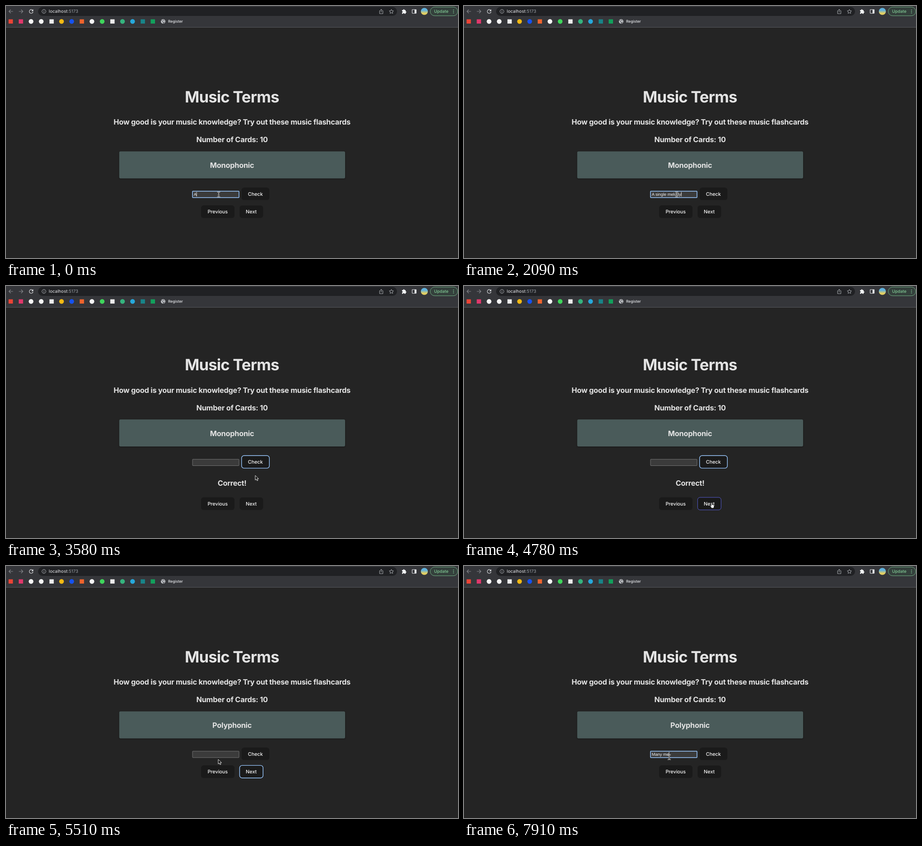
An HTML page that plays this animation: 1001x559 px, repeating every 8 s.

```html
<!DOCTYPE html>
<html lang="en">
<head>
<meta charset="utf-8">
<title>Music Terms</title>
<style>
  html, body { margin: 0; width: 100%; height: 100%; overflow: hidden; background: #242424; }
  svg { display: block; width: 100vw; height: 100vh; }
  text { font-family: Inter, "Open Sans", sans-serif; text-rendering: geometricPrecision; }
  .mid { text-anchor: middle; fill: #e3e3e3; font-weight: 700; }
  .h1 { font-size: 34.7px; letter-spacing: -.85px; }
  .h2 { font-size: 16.3px; letter-spacing: -.23px; }
  .btn rect { fill: #1a1a1a; stroke: none; }
  .btn text { font-size: 10.8px; font-weight: 500; fill: #fafafa; text-anchor: middle; }
  .btn.hover rect { stroke: #646cff; stroke-width: .8; }
  .btn.focus rect { stroke: #99c8ff; stroke-width: 1.4; }
  .field rect { fill: #3b3b3b; stroke: #858585; stroke-width: .8; }
  .field.focus rect { stroke: #99c8ff; stroke-width: 1.5; }
  .field text { font: 9.27px "Liberation Sans", Arial, sans-serif; fill: #f4f4f4; }
  .card { fill: #4a5b5a; filter: drop-shadow(0 1.4px 1.4px rgba(0, 0, 0, .4)); }
  .line { fill: none; stroke: #e8eaed; stroke-width: 1.1; }
  .dim { stroke: #85888c; }
  .thin { stroke: #bdc1c6; stroke-width: .9; }
</style>
</head>
<body>
<svg viewBox="0 0 1001 559" preserveAspectRatio="none">
  <defs>
    <linearGradient id="photo" x2="0" y2="1">
      <stop offset=".35" stop-color="#62b2dc"/>
      <stop offset=".75" stop-color="#e3cf62"/>
    </linearGradient>
  </defs>
  <rect width="1001" height="559" fill="#242424"/>

  <g id="toolbar">
    <rect width="1001" height="47" fill="#35363a"/>
    <rect y="46.8" width="1001" height="1" fill="#5a5c60"/>
    <rect x="71" y="2" width="795" height="20" rx="10" fill="#202124"/>
    <path class="line dim" d="M15.5 12H6.5M10.5 8 6.5 12l4 4M28.5 12h9M33.5 8l4 4-4 4"/>
    <path class="line" d="M59 9.3A4.2 4.2 0 1 0 59.9 13"/>
    <path fill="#e8eaed" d="M60.3 7.3v4.2h-4.2z"/>
    <circle class="line thin" cx="84" cy="12" r="4.3"/>
    <path class="line thin" d="M84 11.3v3M84 9.3v1"/>
    <text x="94.8" y="15.4" font-size="9.7" fill="#e8eaed">localhost<tspan fill="#9aa0a6">:5173</tspan></text>
    <path class="line thin" d="M829 10.5h-1.7v6.5h7.4v-6.5H833M831 14V7.3M829 9.2l2-2 2 2"/>
    <path class="line thin" stroke-linejoin="round" d="M853.5 7.5l1.4 3 3.3.4-2.4 2.2.6 3.3-2.900-1.600-2.900 1.600.6-3.300-2.400-2.200 3.300-.4z"/>
    <path fill="#f1f3f4" d="M877 9h2.300a1.700 1.700 0 1 1 3.400 0h2.300v2.700a1.700 1.700 0 1 1 0 3.400v2.100h-2.600a1.500 1.500 0 0 0-3 0H877v-2.600a1.500 1.500 0 0 0 0-3z"/>
    <rect class="line" x="899.5" y="8" width="9" height="8.2" rx=".6"/>
    <rect x="904.8" y="8" width="3.7" height="8.2" fill="#e8eaed"/>
    <circle cx="926.5" cy="12" r="7.8" fill="url(#photo)"/>
    <rect x="939.5" y="2.3" width="61" height="19.4" rx="9.7" fill="#34403c" stroke="#6fae82"/>
    <text x="948" y="15.3" font-size="9.2" font-weight="500" fill="#81c995">Update</text>
    <g fill="#81c995"><circle cx="991" cy="8.6" r=".9"/><circle cx="991" cy="12" r=".9"/><circle cx="991" cy="15.4" r=".9"/></g>
    <g id="marks"></g>
    <circle cx="348" cy="34.3" r="5" fill="#c6c9cd"/>
    <path fill="none" stroke="#4a4c50" stroke-width="1.1" d="M344 32l3 1.5v2l1.5 1.5v2M347.5 29.8l1 2 3 .5M352 35.5l-2 .5-.5 2"/>
    <text x="359" y="37.4" font-size="8.34" font-weight="500" fill="#e8eaed">Register</text>
  </g>

  <g id="upper">
    <text class="mid h1" x="500.3" y="213.6">Music Terms</text>
    <text class="mid h2" x="500.6" y="263">How good is your music knowledge? Try out these music flashcards</text>
    <text class="mid h2" x="500.6" y="302.4">Number of Cards: 10</text>
    <rect class="card" x="250.7" y="322.6" width="500.3" height="60" rx="3"/>
    <text class="mid h2" id="term" x="500.6" y="359"></text>
    <g class="field" id="field">
      <rect x="413" y="410.8" width="103" height="14.2" rx="1"/>
      <text id="typed" x="415.7" y="420.8"></text>
      <path id="caret" fill="none" stroke="#fff" stroke-width=".9" d="M0 412.5v10"/>
    </g>
    <g class="btn" id="check">
      <rect x="521.7" y="402.8" width="61.6" height="27.8" rx="5.4"/>
      <text x="552.3" y="420.7">Check</text>
    </g>
  </g>

  <text class="mid h2" id="verdict" x="500.6" y="442.7">Correct!</text>

  <g id="lower">
    <g class="btn" id="prev">
      <rect x="432" y="442.3" width="74" height="28" rx="5.6"/>
      <text x="468.8" y="460.3">Previous</text>
    </g>
    <g class="btn" id="next">
      <rect x="517.4" y="442.4" width="51.9" height="27.8" rx="5.4"/>
      <text x="543.2" y="460.3">Next</text>
    </g>
  </g>

  <g id="pointer">
    <g id="beam" fill="none">
      <path stroke="#f2f2f2" stroke-width="1.9" d="M-3.2-5.5Q-.6-5.5 0-4.3.6-5.5 3.2-5.5M-3.2 5.5Q-.6 5.5 0 4.3.6 5.5 3.2 5.5M0-4.3V4.3M-1.7 1.5H1.7"/>
      <path stroke="#1c1c1c" stroke-width=".8" d="M-2.8-5.5Q-.6-5.5 0-4.3.6-5.5 2.8-5.5M-2.8 5.5Q-.6 5.5 0 4.3.6 5.5 2.8 5.5M0-4.3V4.3M-1.5 1.5H1.5"/>
    </g>
    <path id="arrow" fill="#111" stroke="#fff" stroke-width=".9" stroke-linejoin="round"
      d="M0 0V10.2L2.4 8 4 11.7 5.9 10.9 4.3 7.3H7.4Z"/>
    <path id="hand" fill="#fff" stroke="#111" stroke-width=".7" stroke-linejoin="round"
      d="M-1 .8A1 1 0 0 1 1 .8V4Q2.2 3.5 2.7 4.6 3.6 4.1 4.1 5.1 5.3 4.8 5.3 6.2V8Q5.3 9.3 4.4 10.4V11.8H-.7V10.6L-3.3 7.1Q-3.5 5.8-2.2 6.2L-1 7.3Z"/>
  </g>
</svg>

<script>
const LOOP = 8000, SHIFT = 26.5;
const $ = id => document.getElementById(id);

// Bookmark marks: centre x, colour, round or square
const marks = [
  [10.5, '#ea4335'], [33, '#e0386b'], [55.5, '#f5f5f5', 1], [78, '#f5f5f5', 1],
  [101, '#ededed'], [123, '#f4b913', 1], [145.5, '#1652f0', 1], [168, '#f0642d'],
  [190.3, '#f5f5f5', 1], [213, '#3fd65c', 1], [235.7, '#ededed'], [258, '#35b37e', 1],
  [280.3, '#27a9dc', 1], [303, '#188488'], [325.2, '#12a05c']
];
$('marks').innerHTML = marks.map(([x, color, round]) => {
  const size = round ? 10.4 : 9.6;
  return `<rect x="${x - size / 2}" y="${34.3 - size / 2}" width="${size}" height="${size}"
    rx="${round ? size / 2 : 0.6}" fill="${color}"/>`;
}).join('');

// Each track is a list of [time, value...]; a value holds until the next entry
const typing = [
  [0, 'A'], [300, 'A '], [450, 'A si'], [600, 'A sin'], [740, 'A sing'], [890, 'A single'],
  [1040, 'A single '], [1340, 'A single m'], [1490, 'A single me'], [1640, 'A single mel'],
  [1790, 'A single melo'], [1940, 'A single melod'], [2090, 'A single melody'],
  [2240, 'A single melody '], [2390, 'A single melody l'], [2540, 'A single melody li'],
  [2690, 'A single melody lin'], [2840, 'A single melody line'], [3580, ''],
  [5960, 'M'], [6110, 'Ma'], [6260, 'Man'], [6410, 'Many'], [6560, 'Many '], [6710, 'Many m'],
  [6860, 'Many med'], [7010, 'Many medl'], [7310, 'Many medlo'], [7610, 'Many medl'],
  [7760, 'Many med'], [7910, 'Many me']
];
const path = [
  [0, 471, 418, 'beam'], [2980, 447, 419, 'beam'], [3130, 500, 426, 'arrow'],
  [3280, 546, 424, 'hand'], [3430, 552.5, 420.8, 'hand'], [3580, 552, 420.3, 'arrow'],
  [3880, 551, 425, 'arrow'], [4030, 550, 438, 'arrow'], [4180, 548, 456, 'arrow'],
  [4330, 547, 477, 'hand'], [4470, 548, 492, 'hand'], [4620, 548.3, 486, 'hand'],
  [4770, 548.5, 481, 'hand'], [4920, 548.3, 480.2, 'arrow'], [5070, 540, 472, 'arrow'],
  [5220, 508, 449, 'arrow'], [5370, 470, 429, 'arrow'], [5520, 454.5, 424, 'beam']
];
const focus = [[0, 'field'], [3580, 'check'], [4920, 'next'], [5660, 'field']];
const hover = [[0, ''], [3280, 'check'], [3580, ''], [4330, 'next'], [4920, '']];
const caretOn = [[0, true], [3340, false], [5660, true]];
const verdict = [[0, false], [3580, true], [4920, false]];
const term = [[0, 'Monophonic'], [4920, 'Polyphonic']];

const at = (track, t) => track.findLast(step => step[0] <= t).slice(1);
const show = (id, on) => $(id).setAttribute('visibility', on ? 'visible' : 'hidden');
const move = (id, x, y) => $(id).setAttribute('transform', `translate(${x} ${y})`);

const pen = document.createElement('canvas').getContext('2d');
pen.font = '92.7px "Liberation Sans", Arial, sans-serif';
const widthOf = text => pen.measureText(text).width / 10;

function draw(t) {
  const [text] = at(typing, t), [x, y, shape] = at(path, t);
  const [focused] = at(focus, t), [hovered] = at(hover, t), [correct] = at(verdict, t);
  $('typed').textContent = text;
  $('term').textContent = at(term, t)[0];
  move('caret', 415.9 + widthOf(text), 0);
  show('caret', focused === 'field' && at(caretOn, t)[0]);
  for (const id of ['field', 'check', 'prev', 'next']) {
    $(id).classList.toggle('focus', id === focused);
    $(id).classList.toggle('hover', id === hovered);
  }
  show('verdict', correct);
  move('upper', 0, correct ? -SHIFT : 0);
  move('lower', 0, correct ? SHIFT : 0);
  move('pointer', x, y);
  for (const id of ['beam', 'arrow', 'hand']) show(id, id === shape);
}

const start = performance.now();
function tick() {
  draw((performance.now() - start) % LOOP);
  requestAnimationFrame(tick);
}
tick();
</script>
</body>
</html>
```
